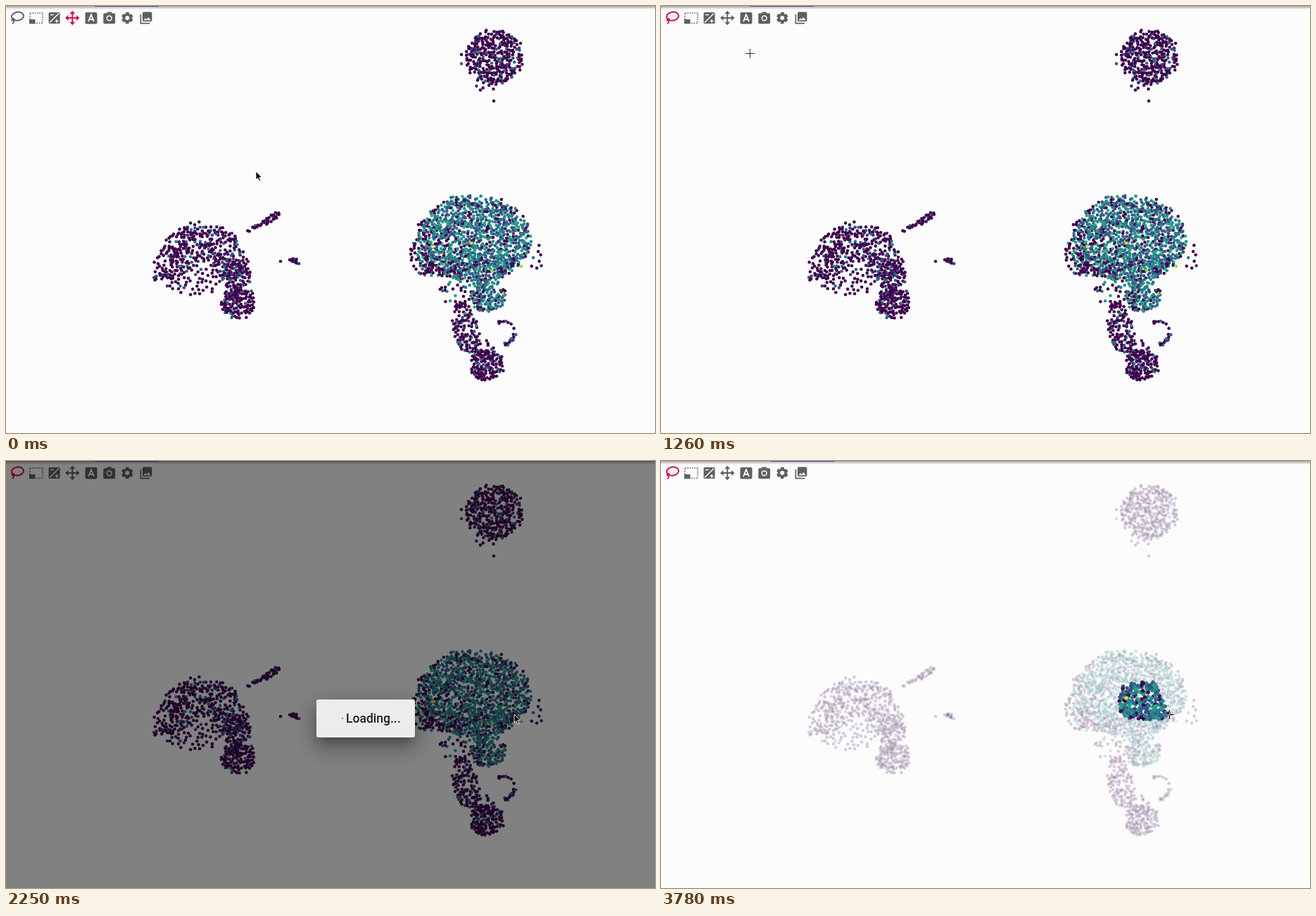
Write an HTML page with a canvas that moves like this. It is 922 by 607 pixels and loops after 3870 ms.

```html
<!DOCTYPE html>
<html lang="en">
<head>
<meta charset="utf-8">
<title>Lasso selection on a scatter plot</title>
<style>
  html, body { margin: 0; width: 100%; height: 100%; overflow: hidden; background: #fcfcfc; }
  #stage { position: relative; width: 922px; height: 607px; overflow: hidden; background: #fcfcfc; font-family: Roboto, sans-serif; }
  #stage > * { position: absolute; }
  canvas, svg, #shade { left: 0; top: 0; width: 922px; height: 607px; }
  #edge { left: 0; top: 0; width: 100%; height: 5px; background: linear-gradient(#aaa 1px, #ccc 2px, #fcfcfc00); }
  #tab { top: 0; width: 91px; height: 1.4px; background: #3f51b5; }
  #tip { right: 875px; top: 39.5px; height: 18.5px; padding: 0 6px; border-radius: 3px; background: #636363; color: #fff; font: 500 8.8px/18.5px Roboto, sans-serif; white-space: nowrap; }
  #shade { background: rgba(0, 0, 0, .49); }
  #dialog { left: 441px; top: 339px; width: 140px; height: 54px; border-radius: 3px; background: #ececec; box-shadow: 0 8px 12px -5px #0004, 0 16px 26px 2px #0003, 0 6px 32px 5px #0002; }
  #dialog span { position: absolute; left: 42px; top: 0; font: 500 17.5px/54px Roboto, sans-serif; color: #222; }
  #dialog i { position: absolute; left: 36px; top: 26px; width: 1.5px; height: 1.5px; border-radius: 50%; background: #777; }
  .icons { color: #5f5f5f; fill: currentColor; }
  .line { fill: none; stroke: currentColor; }
  .cut { fill: none; stroke: #fcfcfc; }
  .on { color: #cf1043; }
  #cross { mix-blend-mode: difference; }
</style>
</head>
<body>
<div id="stage">
  <canvas id="full" width="922" height="607"></canvas>
  <canvas id="faded" width="922" height="607"></canvas>
  <div id="edge"></div>
  <div id="tab"></div>
  <svg class="icons" viewBox="0 0 922 607">
    <g id="lassoIcon" class="line" stroke-width="2">
      <ellipse cx="16.5" cy="14.6" rx="8.6" ry="6" transform="rotate(-8 16.5 14.6)"/>
      <circle cx="10.2" cy="19.6" r="1.7" stroke-width="1.6"/>
      <path d="M11 21q.6 3-2.2 4.4" stroke-width="1.6"/>
    </g>
    <path class="line" d="M34 10H52V24.5H34Z" stroke-width="1.5" stroke-dasharray="1.6 1.7"/>
    <path d="M33 19h8.5v6.2H33z"/>
    <g transform="translate(68.6 17)">
      <rect x="-8" y="-8" width="16" height="16" rx="1.6"/>
      <path class="cut" d="M-6.5 6.5 6.5-6.5M-5.6-4.6h4.8M1 4.4h5M3.5 2v5" stroke-width="1.5"/>
    </g>
    <g id="panIcon" transform="translate(94.3 17)">
      <path class="line" d="M-8 0H8M0-8V8" stroke-width="1.9"/>
      <g id="heads"><path id="head" d="M0-10.2 4-5.8h-8z"/><use href="#head" transform="rotate(180)"/></g>
      <use href="#heads" transform="rotate(90)"/>
    </g>
    <rect x="112.5" y="9" width="17" height="16.5" rx="2"/>
    <path class="cut" d="M117 22.2 121 12.2 125 22.2M118.4 19H123.6" stroke-width="1.8"/>
    <g transform="translate(146.7 17)">
      <path d="M-2.5-8.5h5l1.6 1.8h-8.2z"/>
      <rect x="-8.4" y="-6.8" width="16.8" height="15" rx="1.7"/>
      <circle class="cut" cy=".3" r="3.4" stroke-width="1.5"/>
    </g>
    <g class="line" transform="translate(172.3 17) rotate(11)">
      <circle r="4.8" stroke-width="3.6"/>
      <circle r="7" stroke-width="2.6" stroke-dasharray="4.6 2.73"/>
    </g>
    <g transform="translate(199 17)">
      <rect x="-5" y="-8.4" width="13.4" height="13.4" rx="1.7"/>
      <path class="line" d="M-7.6-5V7.6H5" stroke-width="1.7"/>
      <path fill="#fcfcfc" d="M-3.4 3.2-1 0 .8 2.2 3.3-1 6.8 3.2z"/>
    </g>
  </svg>
  <svg viewBox="0 0 922 607">
    <polygon id="lasso" fill="#c4c4d0" fill-opacity=".27" stroke="#e8e8ee" stroke-opacity=".7" stroke-width="1.2" stroke-dasharray="3 2"/>
  </svg>
  <div id="tip">Lasso Select</div>
  <div id="shade"></div>
  <div id="dialog"><i></i><span>Loading...</span></div>
  <svg id="cross" viewBox="0 0 922 607"><path d="M-6 .5H7M.5-6V7" stroke="#cfcfcf" fill="none"/></svg>
  <svg viewBox="0 0 922 607">
    <path id="arrow" d="M0 0V12L2.8 9.5 4.8 14 6.8 13.2 4.8 8.8H8.5Z" stroke="#fff" stroke-width=".9"/>
    <path id="hand" d="M-.8-2.6c0-1.7 2.3-1.7 2.3 0V2l5.2 1.1c1 .3 1.4 1 1.3 2L7.3 9H.4L-3.8 4.6c-1-1.2.5-2.2 1.5-1.2l1.5 1.2ZM3 2.5v2.2M5 3v2" fill="#fff" stroke="#222" stroke-width="1.1"/>
  </svg>
</div>
<script>
const LOOP = 3870, STEP = 90;
const $ = id => document.getElementById(id);
const show = (id, on) => { $(id).style.display = on ? '' : 'none'; };
const clamp = (v, a, b) => Math.min(b, Math.max(a, v));
const mix = (a, b, k) => a + (b - a) * k;
const lerp = (p, q, k) => [mix(p[0], q[0], k), mix(p[1], q[1], k)];
const ease = k => (k = clamp(k, 0, 1), k * k * (3 - 2 * k));

let seed = 71;
function rnd() {
  seed = seed + 0x6D2B79F5 | 0;
  let r = Math.imul(seed ^ seed >>> 15, 1 | seed);
  r = r + Math.imul(r ^ r >>> 7, 61 | r) ^ r;
  return ((r ^ r >>> 14) >>> 0) / 4294967296;
}
const wobble = s => (rnd() + rnd() - 1) * s;

function inside(poly, x, y) {
  let hit = false;
  poly.forEach(([ax, ay], i) => {
    const [bx, by] = poly[(i || poly.length) - 1];
    if (ay > y !== by > y && x < (bx - ax) * (y - ay) / (by - ay) + ax) hit = !hit;
  });
  return hit;
}

const viridis = [[62, 1, 76], [56, 78, 134], [33, 145, 140], [80, 196, 106], [250, 230, 37]];
function colour(v) {
  const i = Math.min(3, Math.floor(v * 4)), k = v * 4 - i;
  return `rgb(${viridis[i].map((c, j) => Math.round(mix(c, viridis[i + 1][j], k)))})`;
}

// Expression value: zero with probability "none", else spread up to "top".
const level = (none, top) => rnd() < none ? 0 : top * mix(.35, 1, rnd());
const dark = () => level(.82, .42);
const body = (x, y) => level(clamp(.28 + (630 - x) / 95 + (y - 360) / 120, .2, .8), .61);
const neck = (x, y) => level(clamp((690 - x) / 60 + (y - 415) / 60, .15, .9), .62);

const dots = [];
const add = (x, y, v) => dots.push({ x, y, c: colour(v) });

// Ragged elliptical cloud of n dots; "inner" and the angles cut it to a band.
function cloud(n, cx, cy, rx, ry, value, { tilt = 0, inner = 0, from = 0, to = 2 * Math.PI, gap = 2.2 } = {}) {
  for (let tries = n * 30; n && tries; tries--) {
    const a = mix(from, to, rnd());
    const r = Math.sqrt(mix(inner * inner, 1, rnd())) + wobble(.09);
    const u = rx * r * Math.cos(a), v = ry * r * Math.sin(a);
    const x = cx + u * Math.cos(tilt) - v * Math.sin(tilt);
    const y = cy + u * Math.sin(tilt) + v * Math.cos(tilt);
    if (dots.some(d => Math.hypot(d.x - x, d.y - y) < gap)) continue;
    add(x, y, value(x, y));
    n--;
  }
}

// Upper right island
cloud(300, 694, 73, 40, 39, dark);
cloud(4, 683, 116, 20, 4, dark);
add(693, 135, 0);
add(647, 69, 0);
add(647, 82, .3);

// Left crescent with its tail, and the two slivers beside it
cloud(365, 278, 385, 69, 76, dark, { inner: .3, from: Math.PI * .98, to: Math.PI * 2 });
cloud(62, 327, 383, 20, 23, dark);
cloud(42, 268, 390, 42, 21, dark, { gap: 4 });
cloud(115, 330, 422, 24, 23, dark);
cloud(13, 358, 312, 18, 2.5, dark, { tilt: -.5 });
cloud(18, 377, 302, 14, 4.5, dark, { tilt: -.6 });
cloud(12, 410, 362, 9, 3, dark, { tilt: .45, gap: 1 });
add(390, 363, 0);

// Main body, neck, stem and foot
cloud(920, 665, 331, 79, 60, body);
cloud(75, 658, 371, 66, 18, body);
cloud(42, 592, 356, 19, 27, body);
cloud(45, 652, 408, 38, 22, neck, { gap: 3 });
cloud(105, 685, 411, 25, 25, neck);
cloud(105, 653, 457, 18, 38, () => level(.86, .5), { tilt: -.2 });
cloud(14, 676, 486, 20, 12, dark);
cloud(115, 683, 510, 24, 22, dark);
cloud(20, 708, 464, 16, 18, () => level(.45, .45), { inner: .8, from: -2.4, to: 1.6 });
cloud(8, 754, 360, 8, 23, dark, { gap: 6 });

// A few bright cells
add(606, 342, 1);
add(661, 337, .95);
add(690, 376, .86);
add(732, 370, .86);
add(706, 409, .86);

const path = [[700, 312], [656, 317], [651, 335], [651, 356], [664, 367], [710, 367], [722, 360]];

function plot(id, list, radius, alpha) {
  const g = $(id).getContext('2d');
  g.globalAlpha = alpha;
  for (const d of list) {
    g.fillStyle = d.c;
    g.beginPath();
    g.arc(d.x, d.y, radius, 0, 7);
    g.fill();
  }
}
const picked = d => inside(path, d.x, d.y);
plot('full', dots, 2.25, 1);
plot('faded', dots.filter(d => !picked(d)), 2.25, .2);
plot('faded', dots.filter(picked), 2.7, 1);

// Position along the lasso path at a fractional index.
function along(k) {
  const i = Math.min(path.length - 2, Math.floor(k));
  return lerp(path[i], path[i + 1], k - i);
}

const START = [355, 235], BUTTON = [20, 22];
function draw(t) {
  const armed = t >= 1080, loading = t >= 2250 && t < 2340, done = t >= 2340;
  const k = clamp((t - 1620) / 90, 0, path.length - 1);
  const lassoing = t >= 1620 && t < 2250;
  const pos = t < 1170 ? lerp(START, BUTTON, ease((t - 90) / 450))
    : t < 1620 ? lerp(BUTTON, path[0], ease((t - 1170) / 360))
    : along(k);

  const shape = pos[1] < 32 ? 'hand' : armed && (t < 2160 || done) ? 'cross' : 'arrow';
  for (const id of ['arrow', 'hand', 'cross']) show(id, id === shape);
  const target = shape === 'cross' ? $('cross').firstElementChild : $(shape);
  target.setAttribute('transform', `translate(${pos.map(Math.round)})`);

  show('lasso', lassoing);
  if (lassoing) {
    const pts = path.slice(0, Math.floor(k) + 1).concat([pos]);
    $('lasso').setAttribute('points', pts.join(' '));
  }
  show('full', !done);
  show('faded', done);
  show('tip', t >= 630 && t < 1260);
  show('shade', loading);
  show('dialog', loading);
  $('lassoIcon').classList.toggle('on', armed);
  $('panIcon').classList.toggle('on', !armed);
  $('tab').style.left = (done ? 156 : 126) + 'px';
}

function tick() {
  const t = performance.now() % LOOP;
  draw(Math.floor(t / STEP) * STEP);
  requestAnimationFrame(tick);
}
tick();
</script>
</body>
</html>
```
